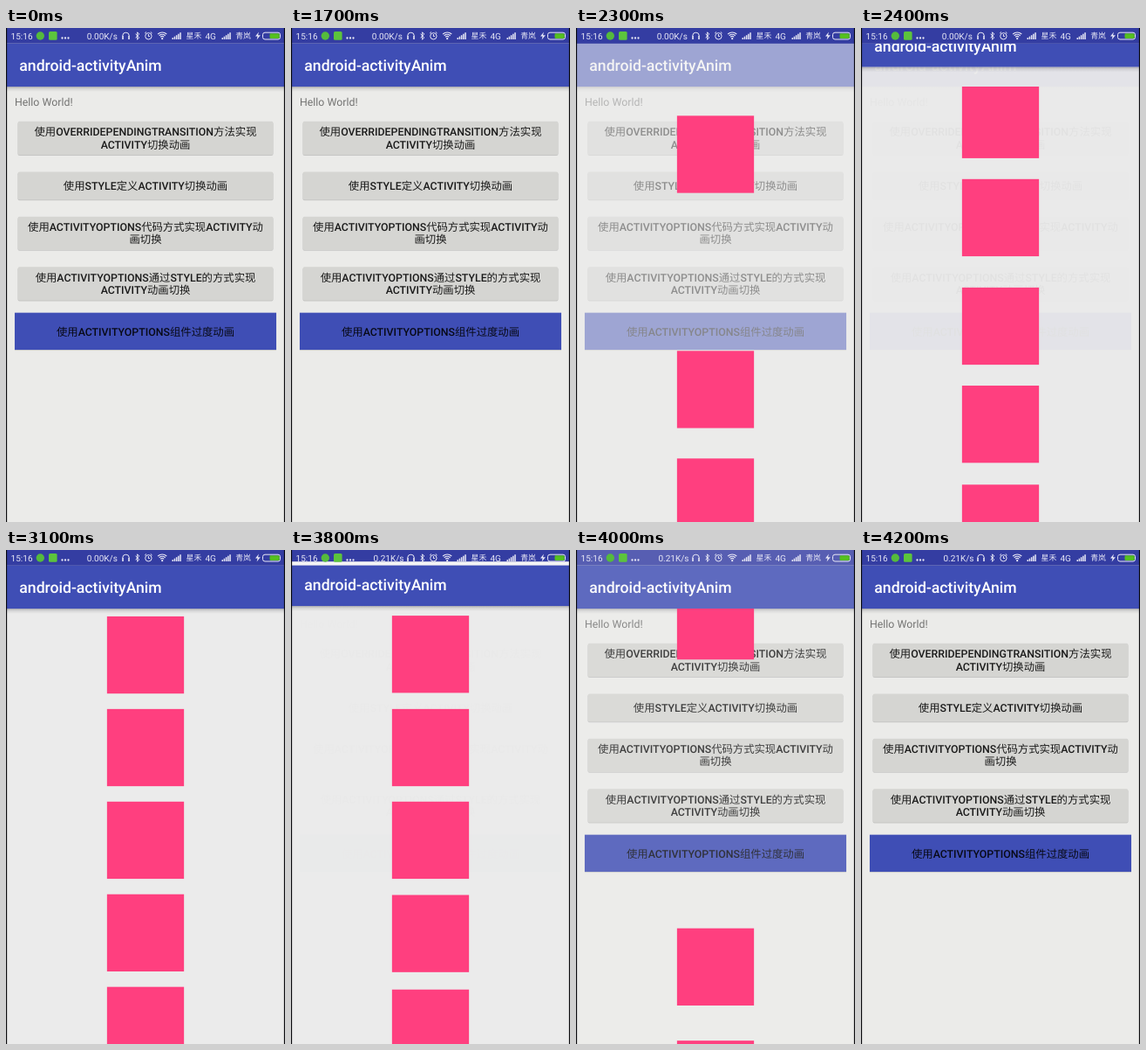
An HTML page with a canvas for the animation above (4300 ms loop, 320x565 px).

```html
<!DOCTYPE html>
<html lang="zh-CN">
<head>
<meta charset="utf-8">
<title>android-activityAnim</title>
<style>
html, body { margin: 0; width: 100%; height: 100%; overflow: hidden; background: #ebebeb; }
canvas { display: block; width: 320px; height: 565px; }
</style>
</head>
<body>
<canvas id="stage" width="320" height="565"></canvas>
<script>
const W = 320, H = 565, LOOP = 4300, STEP = 100;
const DP = H / 640, EDGE = 1.15;
const STATUS_H = 20 * DP, BAR_BOTTOM = 76 * DP, PAD = 10 * DP, INSET = 6 * DP;
const INDIGO = '#3f4eb5', DARK = '#343da2', PINK = '#ff3f7f', PAGE = '#ebebeb';
const TEXT = 'rgba(0,0,0,.88)', BODY = 14 * DP;
const FONT = 'Roboto, "Noto Sans CJK SC", "Noto Sans CJK JP", sans-serif';

const ENTER = 2150, LEAVE = 3800, MOVE = 300, TRAVEL = 326;
const FADE_IN = 2140, FADE_OUT = 3783, FADE = 300;

// direction and stagger in ms by distance from the centre
const squares = [[-1, 15], [-1, 0], [1, 0], [1, 15], [1, 29]];

const buttons = [
  ['使用OVERRIDEPENDINGTRANSITION方法实现', 'ACTIVITY切换动画'],
  ['使用STYLE定义ACTIVITY切换动画'],
  ['使用ACTIVITYOPTIONS代码方式实现ACTIVITY动', '画切换'],
  ['使用ACTIVITYOPTIONS通过STYLE的方式实现', 'ACTIVITY动画切换']
];

const g = document.getElementById('stage').getContext('2d');
g.textRendering = 'geometricPrecision';

const clamp = v => Math.min(1, Math.max(0, v));
const smooth = p => 0.5 - 0.5 * Math.cos(Math.PI * clamp(p));

function rect(x, y, w, h, color) {
  g.fillStyle = color;
  g.fillRect(x, y, w, h);
}

function round(x, y, w, h, r, color) {
  g.fillStyle = color;
  g.beginPath();
  g.roundRect(x, y, w, h, r);
  g.fill();
}

function disc(x, y, r, color) {
  g.fillStyle = color;
  g.beginPath();
  g.arc(x, y, r, 0, 7);
  g.fill();
}

function line(...pts) {
  g.beginPath();
  for (let i = 0; i < pts.length; i += 2) g.lineTo(pts[i], pts[i + 1]);
  g.stroke();
}

function arc(x, y, r, a = 0, b = 2 * Math.PI) {
  g.beginPath();
  g.arc(x, y, r, a, b);
  g.stroke();
}

function below(top, paint) {
  g.save();
  g.beginPath();
  g.rect(0, top, W, H);
  g.clip();
  paint();
  g.restore();
}

function label(str, x, y, size, color, weight = 400, align = 'left') {
  g.font = `${weight} ${size}px ${FONT}`;
  g.textAlign = align;
  g.fillStyle = color;
  g.fillText(str, x, y);
}

// displacement of an exploding part
function offset(t, delay) {
  if (t < LEAVE - 100) return TRAVEL * (1 - clamp((t - ENTER - delay) / MOVE)) ** 2;
  return TRAVEL * clamp((t - LEAVE + delay) / MOVE) ** 2;
}

function toolbar(dy) {
  const y = BAR_BOTTOM + dy;
  const shade = g.createLinearGradient(0, y, 0, y + 6);
  shade.addColorStop(0, 'rgba(0,0,0,.26)');
  shade.addColorStop(0.4, 'rgba(0,0,0,.09)');
  shade.addColorStop(1, 'rgba(0,0,0,0)');
  rect(0, y, W, 6, shade);
  rect(0, STATUS_H + dy, W, BAR_BOTTOM - STATUS_H, INDIGO);
  label('android-activityAnim', EDGE + 16 * DP, 49.2 + dy, 20 * DP, '#fff', 500);
}

function lines(rows, mid) {
  rows.forEach((row, i) => {
    const y = mid + (i - (rows.length - 1) / 2) * 14.4 + 4.4;
    label(row, W / 2, y, BODY, TEXT, 500, 'center');
  });
}

function menu() {
  rect(0, 0, W, H, '#ebebe9');
  label('Hello World!', EDGE + PAD, 89.3, BODY, '#747473');

  const x = EDGE + 14 * DP, w = W - 2 * x;
  let y = 106.8;
  for (const rows of buttons) {
    const h = (rows.length > 1 ? 43.3 : 36) * DP;
    round(x, y + 0.9, w, h, 2, 'rgba(0,0,0,.16)');
    round(x, y, w, h, 2, '#d5d5d2');
    lines(rows, y + h / 2);
    y += h + 2 * INSET + PAD;
  }

  const left = EDGE + PAD, top = y - INSET;
  rect(left, top + 1, W - 2 * left, 48 * DP, 'rgba(0,0,0,.12)');
  rect(left, top, W - 2 * left, 48 * DP, INDIGO);
  lines(['使用ACTIVITYOPTIONS组件过度动画'], top + 24 * DP + 0.4);
  toolbar(0);
  rect(0, 0, W, STATUS_H, DARK);
}

function detail(t) {
  const leaving = t >= LEAVE - 100;
  g.globalAlpha = leaving ? 1 - smooth((t - FADE_OUT) / FADE) : smooth((t - FADE_IN) / FADE);
  rect(0, STATUS_H, W, H, PAGE);
  if (leaving) rect(0, 0, W, STATUS_H, '#f6f6f6');
  g.globalAlpha = 1;

  below(BAR_BOTTOM, () => squares.forEach(([dir, delay], i) => {
    const side = 100 * DP, y = BAR_BOTTOM + PAD + i * 120 * DP;
    rect((W - side) / 2, y + dir * offset(t, delay), side, side, PINK);
  }));
  below(STATUS_H, () => toolbar(-offset(t, 29)));
  rect(0, leaving ? -offset(t, 35) : 0, W, STATUS_H, DARK);
}

function signal(x) {
  for (let i = 0; i < 5; i++) rect(x + i * 2.2, 11.2 - i * 1.5, 1.5, 1.8 + i * 1.5, '#e8e8f6');
}

function statusIcons(t) {
  const ink = '#e8e8f6';
  label('15:16', 5.6, 12.8, 10, ink);
  disc(39.3, 9, 4.7, '#55bb3c');
  round(49, 4, 9.6, 9.8, 1.5, '#5cc43c');
  for (const x of [64.5, 68, 71.5]) disc(x, 11.5, 1.15, ink);

  const idle = t < 3200;
  label(idle ? '0.00K/s' : '0.21K/s', idle ? 92.8 : 94.4, 12.8, 10, ink);

  g.strokeStyle = ink;
  g.lineWidth = 1;
  arc(137.5, 9, 3.8, Math.PI, 0);
  rect(133.2, 9, 1.6, 4, ink);
  rect(140.2, 9, 1.6, 4, ink);
  line(148.5, 6.8, 152.8, 11, 150.6, 13.2, 150.6, 4.8, 152.8, 7, 148.5, 11.2);
  arc(163.4, 9.3, 3.7);
  line(163.4, 7, 163.4, 9.6, 165, 9.6);
  line(159.2, 6, 161, 4.5);
  line(165.8, 4.5, 167.6, 6);
  g.lineWidth = 1.2;
  for (const r of [3, 5.2, 7.6]) arc(179.2, 12.6, r, -2.3, -0.84);
  disc(179.2, 12.2, 1.1, ink);

  signal(190.5);
  label('星禾', 206.6, 12.4, 8.9, ink);
  label('4G', 228.5, 12.8, 10, ink);
  signal(247.5);
  label('青岚', 263.2, 12.4, 8.9, ink);

  g.fillStyle = ink;
  g.beginPath();
  for (const [x, y] of [[290, 4.5], [286, 9.6], [288.6, 9.6], [287.6, 13.6], [291.8, 8.2], [289, 8.2]]) g.lineTo(x, y);
  g.fill();

  g.lineWidth = 1;
  g.beginPath();
  g.roundRect(294.5, 5.2, 20, 7.8, 2.5);
  g.stroke();
  round(302.5, 6.2, 11.2, 5.8, 1.2, '#55c020');
}

function draw(t) {
  menu();
  if (t >= ENTER && t < LEAVE + MOVE) detail(t);
  statusIcons(t);
  rect(0, 0, EDGE, H, '#0c0c10');
  rect(W - EDGE, 0, EDGE, H, '#0c0c10');
}

const start = performance.now();
function tick() {
  const t = (performance.now() - start) % LOOP;
  draw(Math.floor(t / STEP) * STEP);
  requestAnimationFrame(tick);
}
tick();
</script>
</body>
</html>
```
